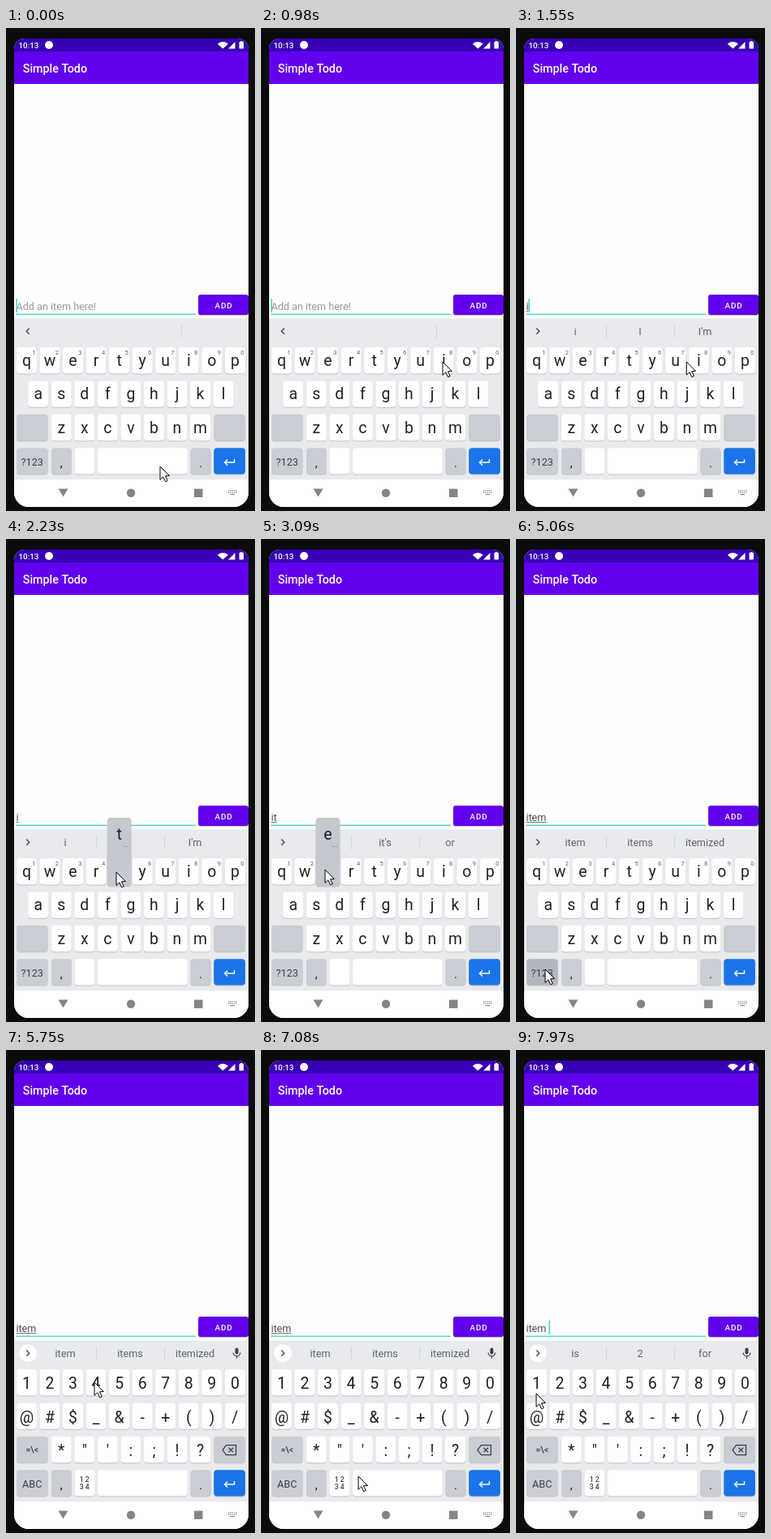
An HTML page with a canvas for the animation above (8 s loop, 307x596 px).

```html
<!DOCTYPE html>
<html lang="en">
<head>
<meta charset="utf-8">
<title>Todo typing</title>
<style>
  html, body { margin: 0; width: 100%; height: 100%; overflow: hidden; background: #0c0c0c; }
  canvas { display: block; width: 307px; height: 596px; }
</style>
</head>
<body>
<canvas id="stage"></canvas>
<script>
const W = 307, H = 596, LOOP = 8000, TICK = 140, BLINK = 500;
const canvas = document.getElementById('stage');
const dpr = window.devicePixelRatio || 1;
canvas.width = W * dpr;
canvas.height = H * dpr;
const ctx = canvas.getContext('2d');
ctx.scale(dpr, dpr);

const INK = '#202124', GRAY = '#5f6368', DARK = '#3c4043', NAV = '#858585';
const KEY_GRAY = '#cacdd3', PRESSED = '#c5c8ce', TEAL = '#35cfc4', PURPLE = '#6200ee';
const PITCH = 28.55, KEY_W = 25, KEY_H = 32.4, ROW_STEP = 41.4;

// The pointer glides to each stop between two ticks, then may press a key for one tick.
const START = { x: 190, y: 541 };
const STOPS = [
  { from: 0, to: 7, x: 224, y: 412, key: 'i', press: 9 },
  { from: 10, to: 14, x: 136, y: 411, key: 't', press: 16 },
  { from: 17, to: 22, x: 79, y: 408, key: 'e', press: 22 },
  { from: 23, to: 27, x: 234, y: 486, key: 'm', press: 29 },
  { from: 30, to: 34, x: 36, y: 531, key: 'mode', press: 36 },
  { from: 37, to: 41, x: 109, y: 410 },
  { from: 43, to: 50, x: 120, y: 526, key: ' ', press: 53 },
  { from: 54, to: 57, x: 25, y: 424 }
];

const SUGGESTIONS = {
  '': [],
  'i': ['i', 'I', "I'm"],
  'it': ['it', "it's", 'or'],
  'ite': ['ite', 'item', 'items'],
  'item': ['item', 'items', 'itemized'],
  'item ': ['is', '2', 'for']
};

const LETTERS = ['qwertyuiop', 'asdfghjkl', 'zxcvbnm'];
const SYMBOLS = ['1234567890', '@#$_&-+()/', '*"\':;!?'];

const rowY = row => 394 + ROW_STEP * row;
const ease = k => k * k * (3 - 2 * k);

function stateAt(tick) {
  const state = { text: '', typedAt: -0.5, symbols: false, pressed: null };
  for (const { key, press } of STOPS) {
    if (!key || tick < press) continue;
    if (tick === press) state.pressed = key;
    else if (key === 'mode') state.symbols = true;
    else {
      state.text += key;
      state.typedAt = press + 1;
    }
  }
  state.caret = ((tick - state.typedAt) * TICK) % (2 * BLINK) < BLINK;
  return state;
}

function pointerAt(tick) {
  return STOPS.reduce((at, stop) => {
    const k = ease(Math.min(1, Math.max(0, (tick - stop.from) / (stop.to - stop.from))));
    return { x: at.x + (stop.x - at.x) * k, y: at.y + (stop.y - at.y) * k };
  }, START);
}

function rect(x, y, w, h, color) {
  ctx.fillStyle = color;
  ctx.fillRect(x, y, w, h);
}

function round(x, y, w, h, r, color) {
  ctx.fillStyle = color;
  ctx.beginPath();
  ctx.roundRect(x, y, w, h, r);
  ctx.fill();
}

function disc(x, y, r, color) {
  ctx.fillStyle = color;
  ctx.beginPath();
  ctx.arc(x, y, r, 0, Math.PI * 2);
  ctx.fill();
}

function trace(points) {
  ctx.beginPath();
  points.forEach(([x, y]) => ctx.lineTo(x, y));
}

function fillShape(points, color) {
  trace(points);
  ctx.fillStyle = color;
  ctx.fill();
}

function line(points, color, width, closed = false) {
  trace(points);
  if (closed) ctx.closePath();
  ctx.strokeStyle = color;
  ctx.lineWidth = width;
  ctx.stroke();
}

function chevron(x, y, w, h, color) {
  line([[x - w, y - h], [x + w, y], [x - w, y + h]], color, 1.4);
}

function label(str, x, y, size, color, weight = 400, align = 'center') {
  ctx.font = `${weight} ${size}px Roboto, sans-serif`;
  ctx.textAlign = align;
  ctx.fillStyle = color;
  ctx.fillText(str, x, y);
}

function drawBars() {
  rect(10, 13, 289, 16, '#3700b3');
  label('10:13', 15.5, 24.7, 9.8, '#fff', 500, 'left');
  disc(53, 21, 5, '#fff');
  ctx.beginPath();
  ctx.moveTo(267.3, 25.5);
  ctx.arc(267.3, 25.5, 8.6, -Math.PI * 0.77, -Math.PI * 0.23);
  ctx.fill();
  fillShape([[274, 25.5], [282.5, 25.5], [282.5, 17]], '#fff');
  round(287.5, 17, 5.5, 8.5, 0.8, '#fff');
  rect(289, 16, 2.5, 1.5, '#fff');

  rect(10, 29, 289, 40, PURPLE);
  label('Simple Todo', 20.8, 54.8, 14.3, '#fff', 500, 'left');
}

function drawInput({ text, caret }) {
  rect(12, 352.6, 222, 1.4, '#4fd6cd');
  label(text || 'Add an item here!', 12.4, 347.9, 12.65, text ? '#505050' : '#9b9b9b', 400, 'left');
  const width = text ? ctx.measureText(text).width : 0;
  if (text.trim() && !text.endsWith(' ')) rect(12.4, 349, width, 1, '#777');
  if (caret) rect(12.3 + width, 334, 1.4, 17, TEAL);

  round(237, 331, 62, 24, 3, 'rgba(0,0,0,.22)');
  round(237, 329, 62, 25, 3, PURPLE);
  ctx.letterSpacing = '0.88px';
  label('ADD', 268.5, 345.8, 9.85, '#fff', 500);
  ctx.letterSpacing = '0px';
}

function drawMic(x, y) {
  round(x - 2, y - 6.5, 4, 8, 2, DARK);
  ctx.strokeStyle = DARK;
  ctx.lineWidth = 1.2;
  ctx.beginPath();
  ctx.arc(x, y - 0.5, 4.3, 0, Math.PI);
  ctx.moveTo(x, y + 3.8);
  ctx.lineTo(x, y + 6.7);
  ctx.stroke();
}

function drawSuggestions({ text, symbols }) {
  const words = SUGGESTIONS[text];
  if (symbols) {
    disc(27, 374, 10.8, '#fff');
    drawMic(284.5, 374);
  }
  chevron(27, 374.2, words.length ? 1.8 : -1.8, 3.6, '#4a4d51');
  const dividers = words.length ? [111, 195] : [216];
  dividers.forEach(x => rect(x, 366, 1, 17, '#d2d5d9'));
  words.forEach((word, i) => label(word, 73 + 80 * i, 379, 12.65, GRAY));
}

function drawKey(x, row, w, color = '#fff') {
  round(x, rowY(row) + 1, w, KEY_H, 4, '#bfc2c7');
  round(x, rowY(row), w, KEY_H, 4, color);
}

function charX(row, i, symbols) {
  const indent = row === 2 ? 1.5 : row === 1 && !symbols ? 0.5 : 0;
  return 25.4 + PITCH * (i + indent);
}

function drawCharKeys(symbols) {
  (symbols ? SYMBOLS : LETTERS).forEach((chars, row) => [...chars].forEach((char, i) => {
    const x = charX(row, i, symbols);
    drawKey(x - KEY_W / 2, row, KEY_W);
    label(char, x, rowY(row) + (symbols ? 24.2 : 22.9), 19.4, INK);
    if (!symbols && row === 0) label((i + 1) % 10, x + 9, 402.6, 7.6, GRAY);
  }));
}

function drawBackspace(x, y) {
  line([[x - 8.5, y], [x - 4, y - 6], [x + 8, y - 6], [x + 8, y + 6], [x - 4, y + 6]], DARK, 1.3, true);
  for (const s of [-1, 1]) line([[x - 1, y - 2.8 * s], [x + 4.6, y + 2.8 * s]], DARK, 1.3);
}

function drawFunctionKeys({ symbols, pressed }) {
  const wide = 38.6, left = 13, right = 256.3;
  drawKey(left, 2, wide, KEY_GRAY);
  drawKey(right, 2, wide, KEY_GRAY);
  drawKey(left, 3, wide, pressed === 'mode' ? '#b2b6bd' : KEY_GRAY);
  drawKey(56, 3, KEY_W, KEY_GRAY);
  drawKey(84.5, 3, KEY_W);
  drawKey(113, 3, 110.7, pressed === ' ' ? PRESSED : '#fff');
  drawKey(227.5, 3, KEY_W, KEY_GRAY);
  drawKey(right, 3, wide, '#1a73e8');

  label(symbols ? 'ABC' : '?123', 32.2, 539.7, 12.6, DARK);
  label(',', 68.2, 541.5, 15, INK);
  label('.', 240, 541.5, 15, INK);
  if (symbols) {
    label('=\\<', 32.2, 497, 10.4, DARK, 500);
    label('1 2', 96.8, 533.3, 8.6, DARK, 500);
    label('3 4', 96.8, 542.4, 8.6, DARK, 500);
    drawBackspace(275.5, 493.6);
  }
  line([[281.5, 532], [281.5, 536], [270, 536]], '#fff', 1.4);
  chevron(271.3, 536, -1.8, 3.5, '#fff');
}

function drawPopup(char) {
  const row = LETTERS.findIndex(chars => chars.includes(char));
  const x = charX(row, LETTERS[row].indexOf(char));
  const top = rowY(row) - 50;
  round(x - 15, top + 1, 30, 84.5, 4, 'rgba(0,0,0,.14)');
  round(x - 14.8, top, 29.6, 84, 4, PRESSED);
  label(char, x, top + 27.3, 19.6, INK);
  if (row === 0) label('...', x + 8.3, top + 36, 9, GRAY);
}

function drawNavBar() {
  rect(10, 557.5, 289, 34, '#fff');
  fillShape([[64.5, 568.5], [76.5, 568.5], [70.5, 578.5]], NAV);
  disc(154, 573.7, 5.2, NAV);
  rect(232, 568.6, 10.5, 10.4, NAV);
  for (let i = 0; i < 10; i++) rect(274 + (i % 5) * 2.3, 570.3 + (i > 4) * 2.3, 1.3, 1.3, NAV);
  rect(276.5, 575, 5.5, 1.2, NAV);
}

function drawPointer({ x, y }) {
  const arrow = [[0, 0], [0, 16.3], [3.8, 12.8], [6.6, 18.8], [9.2, 17.6], [6.5, 11.8], [11.3, 11.4]]
    .map(([dx, dy]) => [x + dx, y + dy]);
  fillShape(arrow, '#fff');
  line(arrow, '#000', 1, true);
}

function draw(tick) {
  const state = stateAt(tick);
  rect(0, 0, W, H, '#0c0c0c');
  ctx.save();
  ctx.beginPath();
  ctx.roundRect(10, 13, 289, 578, [13, 13, 18, 18]);
  ctx.clip();
  rect(10, 13, 289, 578, '#fefefe');
  drawBars();
  drawInput(state);
  rect(10, 358.5, 289, 199, '#e8eaed');
  drawSuggestions(state);
  drawCharKeys(state.symbols);
  drawFunctionKeys(state);
  if (LETTERS.some(chars => chars.includes(state.pressed))) drawPopup(state.pressed);
  drawNavBar();
  ctx.restore();
  drawPointer(pointerAt(tick));
}

function animate() {
  draw(Math.floor((performance.now() % LOOP) / TICK + 0.15));
  requestAnimationFrame(animate);
}
animate();
</script>
</body>
</html>
```
